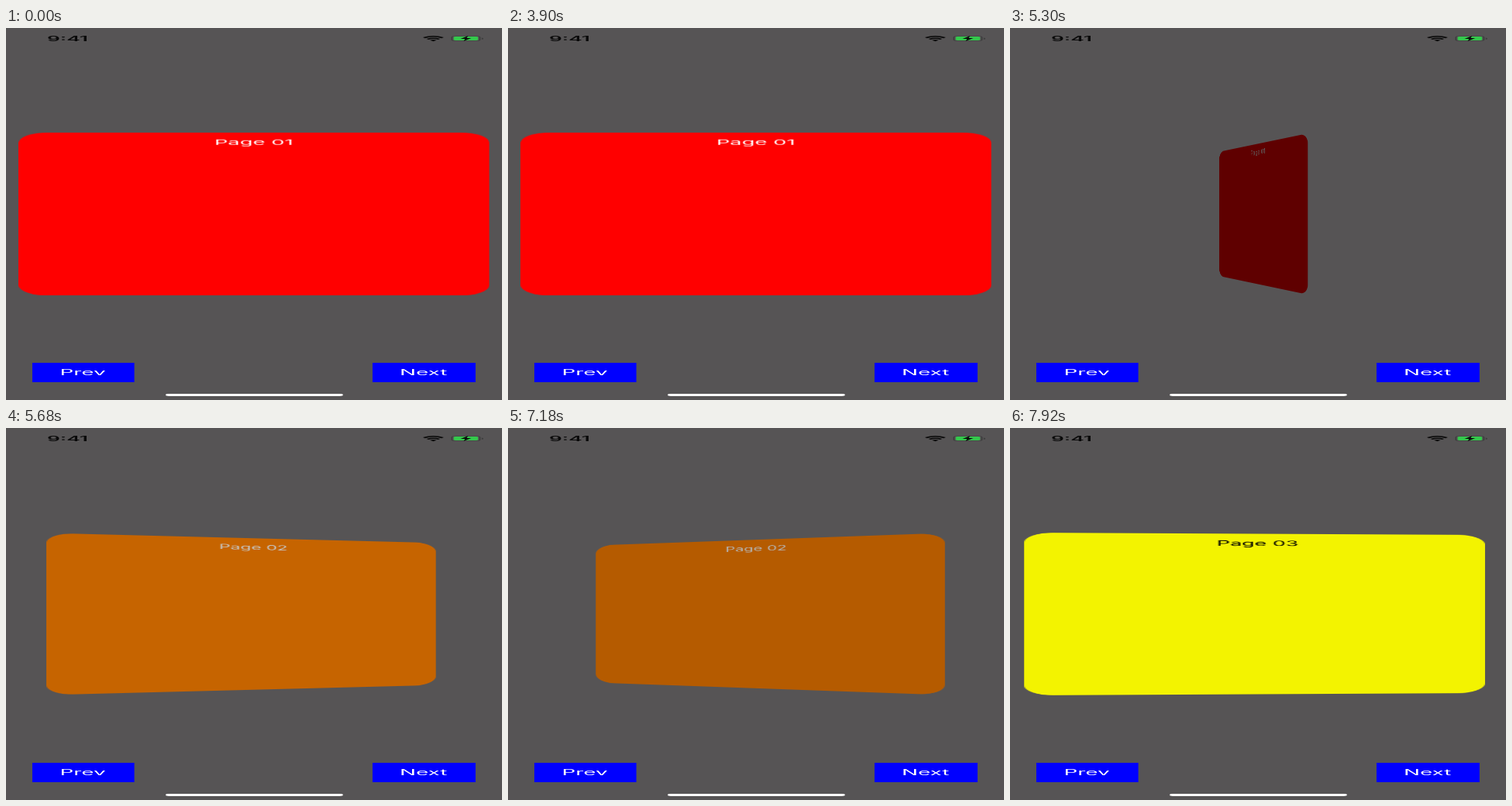
Animation, 640 px wide and 480 px high, one loop 8 s. Source, as an HTML page:

```html
<!DOCTYPE html>
<html lang="en">
<head>
<meta charset="utf-8">
<title>Flipping pages</title>
<style>
  html, body { margin: 0; width: 100%; height: 100%; overflow: hidden; background: #565455; }
  /* A 390 x 844 point phone screen squeezed onto a 640 x 480 stage. */
  #screen {
    position: absolute; left: 0; top: 0; width: 390px; height: 844px;
    transform-origin: 0 0; transform: scale(calc(640 / 390), calc(480 / 844));
    font: 17px Inter, Roboto, sans-serif;
  }
  svg { position: absolute; left: 0; top: 0; }
  #card {
    position: absolute; left: 10.3px; top: 237.3px; width: 369.6px; height: 369.6px;
    border-radius: 23px; text-align: center; font-size: 16.7px; line-height: 44px;
  }
</style>
</head>
<body>
<div id="screen">
  <svg width="390" height="844" viewBox="0 0 390 844">
    <g fill="#0a0a0a">
      <text x="32.3" y="30" font-size="16" font-weight="600">9:41</text>
      <g fill="none" stroke="#0a0a0a" stroke-width="2.5">
        <path d="M328.6 22.2Q336 15.8 343.4 22.2M331.4 25.6Q336 21.4 340.6 25.6"/>
      </g>
      <path d="M333.4 27.6Q336 25.2 338.6 27.6L336 30.4Z"/>
      <rect x="350.6" y="18" width="22" height="11.6" rx="3" fill="none" stroke="#3c3c3c"/>
      <path d="M374 22v4q1.4-.6 1.4-2t-1.4-2" fill="#3c3c3c"/>
      <rect x="352" y="19.4" width="19.2" height="8.8" rx="1.8" fill="#34c84c"/>
      <path d="M363.4 17.6L357.4 24.6H361L359.8 30L365.8 23H362.2Z"/>
    </g>
    <g fill="#00f">
      <rect x="20.7" y="759.6" width="80.2" height="44"/>
      <rect x="288.2" y="759.6" width="81" height="44"/>
    </g>
    <g fill="#fff" text-anchor="middle">
      <text x="60.4" y="787.8">Prev</text>
      <text x="328.3" y="787.8">Next</text>
    </g>
    <rect x="125.5" y="830" width="139.5" height="5" rx="2.5" fill="#fff"/>
  </svg>
  <div id="card"></div>
</div>
<script>
const LOOP = 8000;
const PERSPECTIVE = 1200;
const PUSH_BACK = 200;
const MAX_SHADE = 0.73;

const pages = [
  { title: "Page 01", fill: "#ff0000", ink: "#fff" },
  { title: "Page 02", fill: "#ff8000", ink: "#fff" },
  { title: "Page 03", fill: "#ffff00", ink: "#000" },
];
const flips = [
  { start: 4701, duration: 1316 },
  { start: 6812, duration: 1250 },
];
const card = document.getElementById("card");

const easeInOut = u => (1 - Math.cos(Math.PI * u)) / 2;
const clamp01 = u => Math.min(1, Math.max(0, u));

function draw(time) {
  // Each flip adds one to the position; the page changes when edge-on.
  const position = flips.reduce(
    (sum, { start, duration }) => sum + easeInOut(clamp01((time - start) / duration)), 0);
  const index = Math.round(position);
  const turn = index - position;
  const angle = turn * Math.PI;
  const depth = PUSH_BACK * Math.abs(Math.sin(angle));
  const page = pages[index];

  card.textContent = page.title;
  card.style.background = page.fill;
  card.style.color = page.ink;
  card.style.filter = turn ? `brightness(${1 - 2 * MAX_SHADE * Math.abs(turn)})` : "none";
  card.style.transform =
    `perspective(${PERSPECTIVE}px) translateZ(${-depth}px) rotateY(${angle}rad)`;
}

function tick() {
  draw(performance.now() % LOOP);
  requestAnimationFrame(tick);
}
tick();
</script>
</body>
</html>
```
